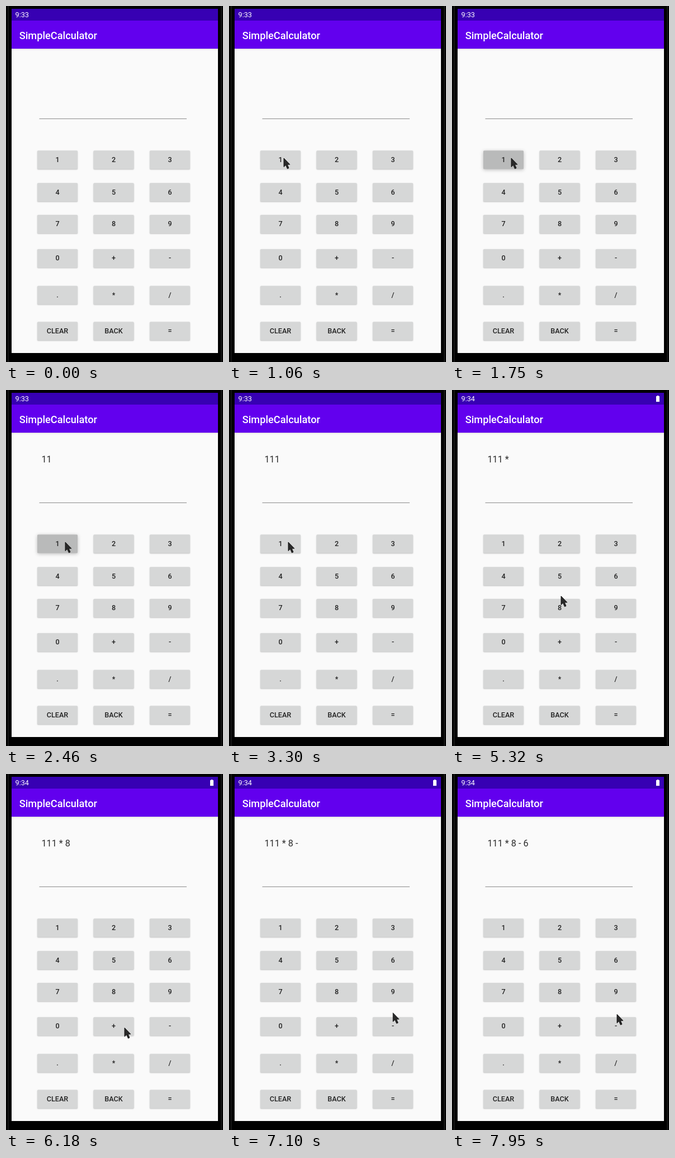
Write an HTML page with a canvas that moves like this. It is 388 px wide and 634 px high and loops after 8 s.

```html
<!DOCTYPE html>
<html lang="en">
<head>
<meta charset="utf-8">
<title>Calculator demo</title>
<style>
html, body { margin: 0; width: 100%; height: 100%; overflow: hidden; background: #000; }
canvas { display: block; }
</style>
</head>
<body>
<canvas id="stage" width="388" height="634"></canvas>
<script>
const ctx = document.getElementById('stage').getContext('2d');
const LOOP = 8000;
const TICK = 76;          // the pointer moves in steps of this length
const ENTRY_LEAD = 240;   // an entry shows this long before its key has faded back

const ROWS = [257.5, 315.2, 372, 433, 498.5, 562.5];
const KEYS = '1 2 3 4 5 6 7 8 9 0 + - . * / CLEAR BACK ='.split(' ');
const KEY_W = 72, KEY_H = 33;

// Pointer path: leave, arrive, x, y
const PATH = [
  [140, 450, 151, 382], [680, 1060, 98, 271], [1520, 1750, 106, 271],
  [3450, 4070, 297, 486], [4150, 4380, 191, 520], [4860, 5320, 195, 367],
  [5400, 5470, 194, 403], [6100, 6180, 212, 452], [6250, 6330, 230, 484],
  [6480, 6640, 292, 455], [7100, 7330, 297, 337], [7870, 7950, 295, 428]
];

// Key presses: label, down, up
const PRESSES = [
  ['1', 1290, 2150], ['1', 2300, 2690], ['1', 2920, 3300], ['*', 4530, 4930],
  ['8', 5640, 5940], ['-', 6790, 7100], ['6', 7480, 7870]
];

function rect(x, y, w, h, color) {
  ctx.fillStyle = color;
  ctx.fillRect(x, y, w, h);
}

function text(str, x, y, size, color, weight = 400, align = 'left') {
  ctx.font = `${weight} ${size}px Roboto, sans-serif`;
  ctx.textAlign = align;
  ctx.fillStyle = color;
  ctx.fillText(str, x, y);
}

function setShadow(alpha, blur, dy) {
  ctx.shadowColor = `rgba(0,0,0,${alpha})`;
  ctx.shadowBlur = blur;
  ctx.shadowOffsetY = dy;
}

function drawBezel() {
  for (const x of [0, 379]) rect(x, 0, 10, 634, '#000');
  for (const x of [3, 384]) rect(x, 0, 2, 634, '#161616');
}

function drawScreen(t) {
  rect(0, 0, 388, 634, '#000');
  rect(10, 5, 369, 613, '#fafafa');
  setShadow(0.2, 3, 0.5);
  rect(10, 26, 369, 50, '#6200ee');
  setShadow(0, 0, 0);
  rect(10, 5, 369, 21, '#3700b3');
  drawBezel();

  const charged = t >= 3600;
  text(charged ? '9:34' : '9:33', 16.5, 20, 12.7, '#fff');
  if (charged) {
    rect(366.5, 10, 3, 1, '#fff');
    rect(365, 11, 6, 10, '#fff');
  }
  text('SimpleCalculator', 23.7, 58.5, 18.2, '#fff', 500);
}

function entryAt(t) {
  return PRESSES.filter(([, , up]) => t >= up - ENTRY_LEAD)
    .map(([label]) => /\d/.test(label) ? label : ` ${label} `)
    .join('');
}

function pressLevel(label, t) {
  const press = PRESSES.find(([key, down, up]) => key === label && t >= down && t < up);
  return press ? Math.min(1, 0.5 + (t - press[1]) / 150) : 0;
}

function drawKey(label, i, t) {
  const x = 56 + 100.5 * (i % 3), y = ROWS[Math.floor(i / 3)];
  const level = pressLevel(label, t);
  const gray = Math.round(215 - 29 * level);

  setShadow(0.25, 2 + 4 * level, 0.8 + 0.4 * level);
  ctx.fillStyle = `rgb(${gray - 1},${gray},${gray})`;
  ctx.beginPath();
  ctx.roundRect(x, y, KEY_W, KEY_H, 1.5);
  ctx.fill();
  setShadow(0, 0, 0);
  text(label, x + KEY_W / 2, y + 20.4, 12.6, '#222', 500, 'center');
}

function pointerAt(t) {
  let x = 340, y = 680;
  for (const [leave, arrive, toX, toY] of PATH) {
    if (t < leave) break;
    const steps = Math.round((arrive - leave) / TICK) + 1;
    const p = Math.min(1, (Math.floor((t - leave) / TICK) + 1) / steps);
    x += (toX - x) * p;
    y += (toY - y) * p;
  }
  return [x, y];
}

function drawPointer(x, y) {
  ctx.save();
  ctx.translate(x, y);
  ctx.beginPath();
  [[0, 0], [0, 15.5], [3.5, 12.2], [6.4, 18.8], [9, 17.6], [6.2, 11.2], [10.8, 11.2]]
    .forEach(([px, py]) => ctx.lineTo(px, py));
  ctx.closePath();
  ctx.fillStyle = '#2a2a2a';
  ctx.fill();
  ctx.lineWidth = 0.8;
  ctx.strokeStyle = '#000';
  ctx.stroke();
  ctx.restore();
}

function draw(t) {
  drawScreen(t);
  text(entryAt(t), 63.5, 129.4, 16.2, '#2c2c2c');
  rect(59.5, 200.3, 263.5, 1, '#868686');
  KEYS.forEach((label, i) => drawKey(label, i, t));
  if (t >= PATH[0][0]) drawPointer(...pointerAt(t));
}

const origin = performance.now();
function loop() {
  draw((performance.now() - origin) % LOOP);
  requestAnimationFrame(loop);
}
loop();
</script>
</body>
</html>
```
